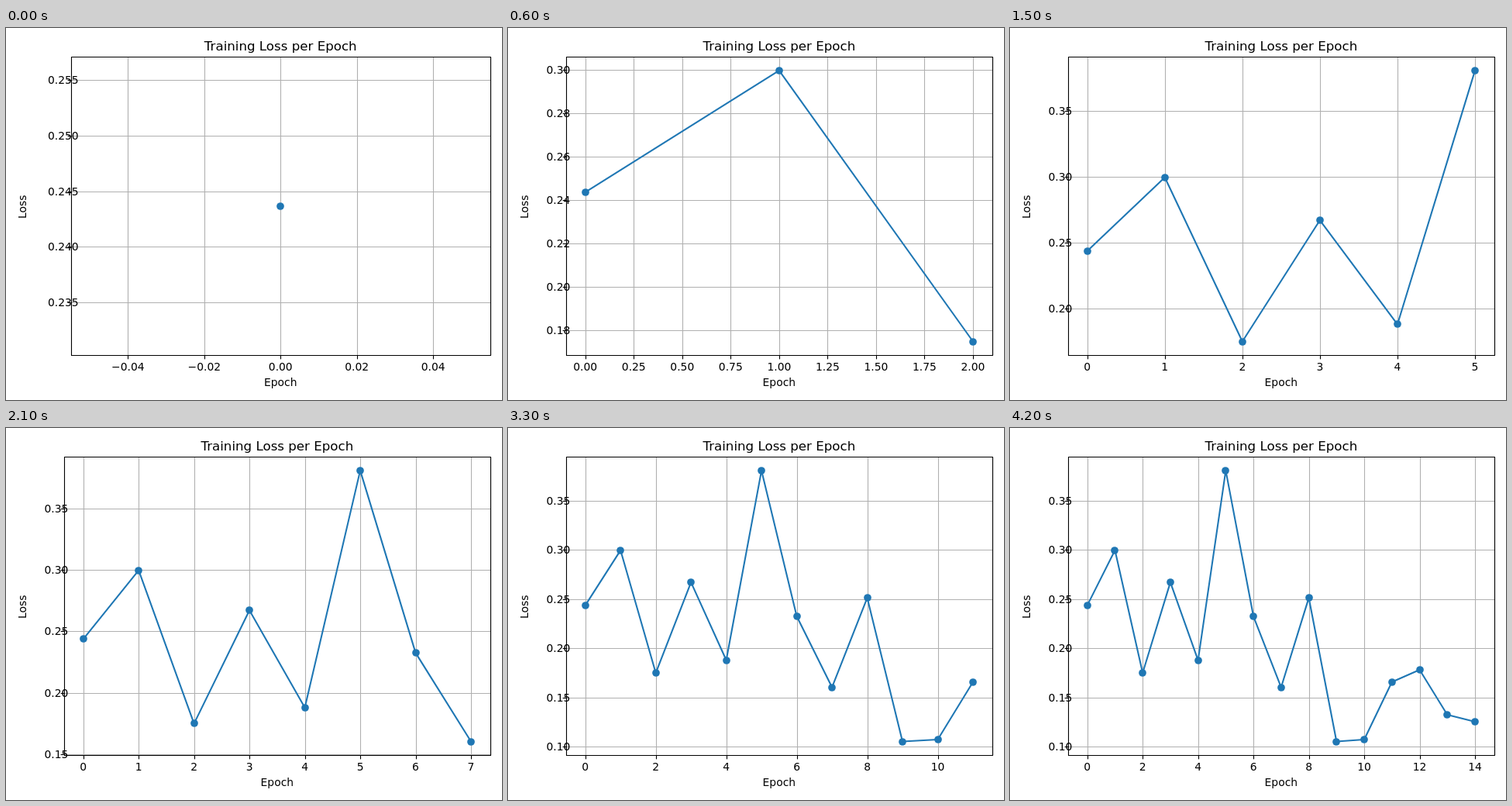
An HTML page with a canvas that plays this animation: 640 px wide and 480 px high, repeating every 4.5 s.

```html
<!DOCTYPE html>
<html lang="en">
<head>
<meta charset="utf-8">
<title>Training Loss per Epoch</title>
<style>
  html, body { margin: 0; width: 100%; height: 100%; overflow: hidden; background: #fff; }
  canvas { display: block; }
</style>
</head>
<body>
<canvas id="chart" width="640" height="480"></canvas>
<script>
const ctx = document.getElementById('chart').getContext('2d');
const losses = [0.24367, 0.2997, 0.1749, 0.2671, 0.1879, 0.3809, 0.2325, 0.1603,
                0.2513, 0.1051, 0.1071, 0.1657, 0.1781, 0.1323, 0.1252];
const STEP_MS = 300;
const PT = 100 / 72;
const TOP = 37.4, BOTTOM = 422, RIGHT = 625;
const BLUE = '#1f77b4';

const snap = v => Math.round(v) + 0.5;

// Data limits with a 5% margin; a single value is widened first.
function limits(values) {
  let lo = Math.min(...values), hi = Math.max(...values);
  if (lo === hi) {
    const spread = Math.abs(lo) * 0.05 || 0.05;
    lo -= spread;
    hi += spread;
  }
  const margin = (hi - lo) * 0.05;
  return [lo - margin, hi + margin];
}

// Round tick values giving at most nine intervals.
function ticks([lo, hi]) {
  const raw = (hi - lo) / 9;
  const power = 10 ** Math.floor(Math.log10(raw));
  const step = +([1, 2, 2.5, 5, 10].find(s => s * power >= raw) * power).toPrecision(3);
  const decimals = (String(step).split('.')[1] || '').length;
  const list = [];
  for (let i = Math.ceil(lo / step); i * step <= hi; i++) {
    list.push({ value: i * step, label: (i * step).toFixed(decimals).replace('-', '\u2212') });
  }
  return list;
}

function line(x1, y1, x2, y2, color) {
  ctx.strokeStyle = color;
  ctx.lineWidth = 0.8 * PT;
  ctx.beginPath();
  ctx.moveTo(x1, y1);
  ctx.lineTo(x2, y2);
  ctx.stroke();
}

function text(str, x, y, align = 'center', size = 10) {
  ctx.font = `${size * PT}px "DejaVu Sans", sans-serif`;
  ctx.textAlign = align;
  ctx.fillStyle = '#000';
  ctx.fillText(str, x, y);
}

function draw(count) {
  const data = losses.slice(0, count);
  const left = count === 1 ? 83.5 : 74.7;
  const xLim = limits([0, count - 1]), yLim = limits(data);
  const toX = v => left + (v - xLim[0]) / (xLim[1] - xLim[0]) * (RIGHT - left);
  const toY = v => BOTTOM - (v - yLim[0]) / (yLim[1] - yLim[0]) * (BOTTOM - TOP);
  const xTicks = ticks(xLim), yTicks = ticks(yLim);
  const midX = (left + RIGHT) / 2;
  const [l, r, t, b] = [left, RIGHT, TOP, BOTTOM].map(snap);
  const tickLength = 3.5 * PT;

  ctx.fillStyle = '#fff';
  ctx.fillRect(0, 0, 640, 480);

  for (const { value, label } of xTicks) {
    const x = snap(toX(value));
    line(x, t, x, b, '#b0b0b0');
    line(x, b, x, b + tickLength, '#000');
    text(label, toX(value), 442);
  }
  for (const { value, label } of yTicks) {
    const y = snap(toY(value));
    line(l, y, r, y, '#b0b0b0');
    line(l - tickLength, y, l, y, '#000');
    text(label, left - 7 * PT, Math.round(toY(value) + 5));
  }

  ctx.strokeStyle = ctx.fillStyle = BLUE;
  ctx.lineWidth = 1.5 * PT;
  ctx.lineJoin = 'round';
  ctx.beginPath();
  data.forEach((v, i) => ctx.lineTo(toX(i), toY(v)));
  ctx.stroke();
  data.forEach((v, i) => {
    ctx.beginPath();
    ctx.arc(Math.round(toX(i)), Math.round(toY(v)), 3.5 * PT, 0, 2 * Math.PI);
    ctx.fill();
  });

  ctx.strokeStyle = '#000';
  ctx.lineWidth = 0.8 * PT;
  ctx.strokeRect(l, t, r - l, b - t);

  text('Training Loss per Epoch', midX, 29, 'center', 12);
  text('Epoch', midX, 462);
  ctx.save();
  ctx.translate(26, (TOP + BOTTOM) / 2 + 1);
  ctx.rotate(-Math.PI / 2);
  text('Loss', 0, 0);
  ctx.restore();
}

function frame() {
  draw(Math.floor(performance.now() / STEP_MS) % losses.length + 1);
  requestAnimationFrame(frame);
}
frame();
</script>
</body>
</html>
```
